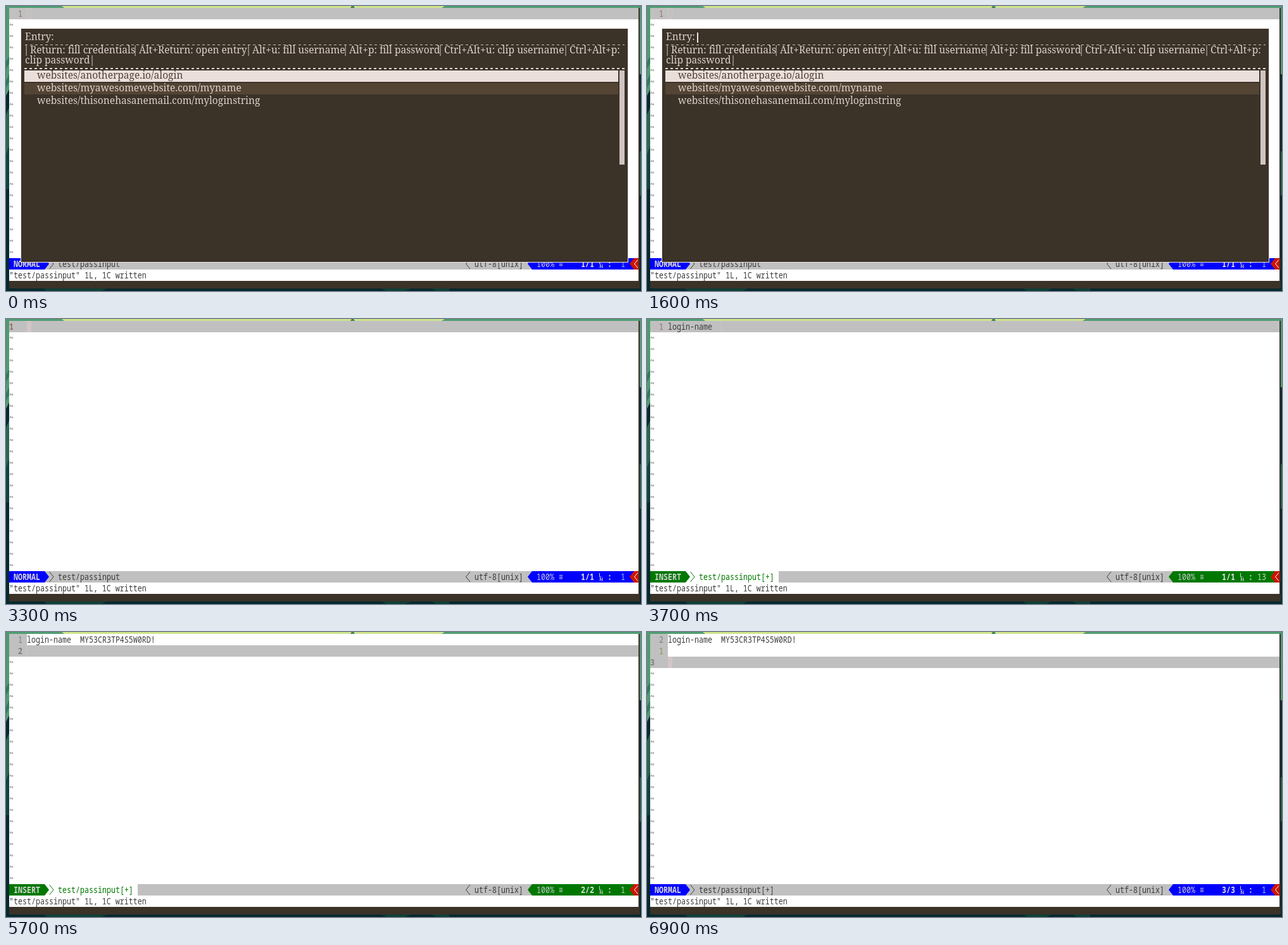
Animation, 1003 px wide and 451 px high, one loop 8 s. Source, as an HTML page:

```html
<!DOCTYPE html>
<html lang="en">
<head>
<meta charset="utf-8">
<title>Password picker</title>
<style>
  html, body { margin: 0; width: 100%; height: 100%; overflow: hidden; background: #06292f; }
  svg { display: block; width: 1003px; height: 451px; }
  text { white-space: pre; }
  .mono { font: 11.667px "Noto Sans Mono", "DejaVu Sans Mono", monospace; }
  .bold { font-weight: 700; }
  .menu { font-family: "Noto Serif", "Liberation Serif", serif; }
</style>
</head>
<body>
<svg id="stage" viewBox="0 0 1003 451" xmlns="http://www.w3.org/2000/svg"></svg>
<script>
const LOOP = 8000;
const GRAY = '#c0c0c0', BROWN = '#3b3228', INK = '#3c3c3c', PALE = '#ddd1cc', CURSOR = '#d2c6c6';
const LOGIN = 'login-name  MY53CR3TP4S5W0RD!';
const ENTRIES = [
  'websites/anotherpage.io/alogin',
  'websites/myawesomewebsite.com/myname',
  'websites/thisonehasanemail.com/myloginstring'
];
// x of each hint; its divider stands 6px before
const HINTS = [
  [38, 'Return: fill credentials'], [210, 'Alt+Return: open entry'],
  [389, 'Alt+u: fill username'], [542, 'Alt+p: fill password'],
  [692, 'Ctrl+Alt+u: clip username'], [890, 'Ctrl+Alt+p:']
];
const stage = document.getElementById('stage');

// menu font size from the width of its longest entry
const pen = document.createElement('canvas').getContext('2d');
pen.font = '100px "Noto Serif", "Liberation Serif", serif';
const menuSize = (35250 / pen.measureText(ENTRIES[2]).width).toFixed(2);

const rect = (x, y, w, h, fill) =>
  `<rect x="${x}" y="${y}" width="${w}" height="${h}" fill="${fill}"/>`;
const shape = (d, fill) => `<path d="${d}" fill="${fill}"/>`;
const line = (d, color, width = 1, more = '') =>
  `<path d="${d}" fill="none" stroke="${color}" stroke-width="${width}" ${more}/>`;
const mono = (x, row, s, fill = INK, bold = false) =>
  `<text class="mono${bold ? ' bold' : ''}" transform="translate(${x} ${17 + row * 18}) scale(1 1.2)" fill="${fill}">${s}</text>`;
const serif = (x, y, s, fill = PALE, anchor = 'start') =>
  `<text class="menu" font-size="${menuSize}" x="${x}" y="${y}" fill="${fill}" text-anchor="${anchor}">${s}</text>`;

function backdrop() {
  return rect(0, 0, 1003, 451, '#06292f')
    + rect(0, 0, 1003, 3, '#4f9d72')
    + shape('M88 0H693L688 3H92Z', '#cfe48c')
    + shape('M544 3L546 0H549L551 3Z', '#3f7f58')
    + shape('M0 0H5V132L0 142Z', '#4f9a70')
    + shape('M0 88L5 80V90L0 100ZM0 118L5 108V120L0 130Z', '#2f7a5c')
    + shape('M0 172L5 160V222L0 236Z', '#28654f')
    + shape('M0 236L5 222V290H0Z', '#0e433f')
    + rect(1001, 0, 2, 108, '#4f9a70')
    + rect(1001, 230, 2, 70, '#1f5b4a')
    + shape('M60 447H158L152 451H64ZM594 447H640L630 451H600ZM672 447H700V451H680Z', '#0d4038')
    + rect(5, 3, 996, 444, BROWN)
    + rect(5, 3, 994, 432, '#fff');
}

function editor(s) {
  const { line: cur, insert, focus } = s;
  const top = 3 + cur * 18;
  const relative = focus && !insert;
  let out = rect(5, 3, 28, 18 * (cur + 1), GRAY) + rect(5, top, 994, 18, GRAY);

  const x = 33 + (cur ? 0 : s.typed * 7);
  if (!focus) out += line('M33.5 3.5h6v17h-6z', CURSOR);
  else out += rect(x, top, insert ? 1 : 7, 18, CURSOR);

  for (let i = 0; i <= cur; i++) {
    const here = i === cur;
    const label = relative && !here ? cur - i : i + 1;
    const color = cur === 0 ? '#a06464' : relative && label === 1 ? '#84944c' : '#7c7c7c';
    out += mono(relative && here ? 5 : 19, i, label, color, here && focus && (cur > 0 || !insert));
  }
  out += mono(33, 0, LOGIN.slice(0, s.typed));
  for (let i = cur + 1; i < 22; i++) out += mono(5, i, '~', '#606060');
  return out + status(s) + mono(5, 23, '"test/passinput" 1L, 1C written');
}

function status(s) {
  const { insert, line: cur } = s;
  const main = insert ? '#007800' : '#0000ff';
  const file = insert ? '#007800' : INK;
  const n = cur + 1;
  const col = String(cur ? 1 : s.typed + 1 - (s.typed === 0 && insert ? 0 : 0)).padStart(2);
  return rect(5, 399, 994, 18, GRAY)
    + (insert ? rect(61, 399, 147, 18, '#fff') : '')
    + shape('M5 399H61L68 408L61 417H5Z', main)
    + mono(12, 22, insert ? 'INSERT' : 'NORMAL', '#d4d4d4', true)
    + line('M68.5 400L75 408L68.5 416', file)
    + mono(82, 22, 'test/passinput' + (s.typed ? '[+]' : ''), file)
    + line('M733 400L726.5 408L733 416', INK)
    + mono(740, 22, 'utf-8[unix]')
    + shape('M985 399H831L824 408L831 417H985Z', main)
    + rect(984, 399, 8, 18, main)
    + mono(838, 22, '100% ≡', '#c8c8d0')
    + mono(908, 22, `${n}/${n}`, '#e0e0e0', true)
    + line('M937.5 402V408H940.5M938.5 415V409.5L942 414.5V409', '#d0d0d0')
    + mono(950, 22, ':', '#d0d0d0', true)
    + mono(964, 22, col, insert ? '#c4d0c4' : '#9cc4dc')
    + shape('M999 399H992L985 408L992 417H999Z', '#cc1400')
    + line('M998 401.5L992.5 408L998 414.5', '#fff');
}

function menu(s) {
  let out = rect(23, 35, 960, 371, '#f1e8e6') + rect(24, 36, 958, 369, BROWN)
    + serif(30, 54, 'Entry:')
    + (s.caret ? rect(79, 42, 2, 16, '#f0e6e2') : '')
    + line('M30 61.5H977', '#cfc3be', 1, 'stroke-dasharray="4 4"')
    + line('M29 99H977', '#e6dad6', 2, 'stroke-dasharray="4 4"');
  for (const [x, label] of HINTS)
    out += serif(x - 6, 75, '|', PALE, 'middle') + serif(x, 75, label);
  out += serif(30, 91, 'clip password') + serif(136, 91, '|', PALE, 'middle');

  ENTRIES.forEach((name, i) => {
    const y = 102 + i * 20, picked = i === s.pick;
    if (picked || i === 1) out += rect(29, y, 938, 18, picked ? '#ebdfdc' : '#534434');
    out += serif(49, y + 13, name, picked ? '#514235' : PALE);
  });
  return out + rect(969, s.pick ? 176 : 102, 8, 149, '#d0c4c1');
}

// typing advances once per 100 ms
function typedAt(t) {
  const steps = (from, max) => Math.min(max, Math.max(0, Math.floor((t - from) / 100) + 1));
  return steps(3500, 3) * 4 + Math.round(steps(3900, 5) * 3.4);
}

function stateAt(t) {
  return {
    focus: t >= 3300,
    pick: t >= 500 && t < 1600 ? 1 : 0,
    caret: t >= 900 && t < 2100,
    insert: t >= 3500 && t < 6900,
    typed: typedAt(t),
    line: t < 5700 ? 0 : t < 6000 ? 1 : 2
  };
}

let shown = '';
function draw(t) {
  const s = stateAt(t), key = JSON.stringify(s);
  if (key === shown) return;
  shown = key;
  stage.innerHTML = backdrop() + editor(s) + (s.focus ? '' : menu(s));
}

const start = performance.now();
function tick() {
  draw((performance.now() - start) % LOOP);
  requestAnimationFrame(tick);
}
tick();
</script>
</body>
</html>
```
